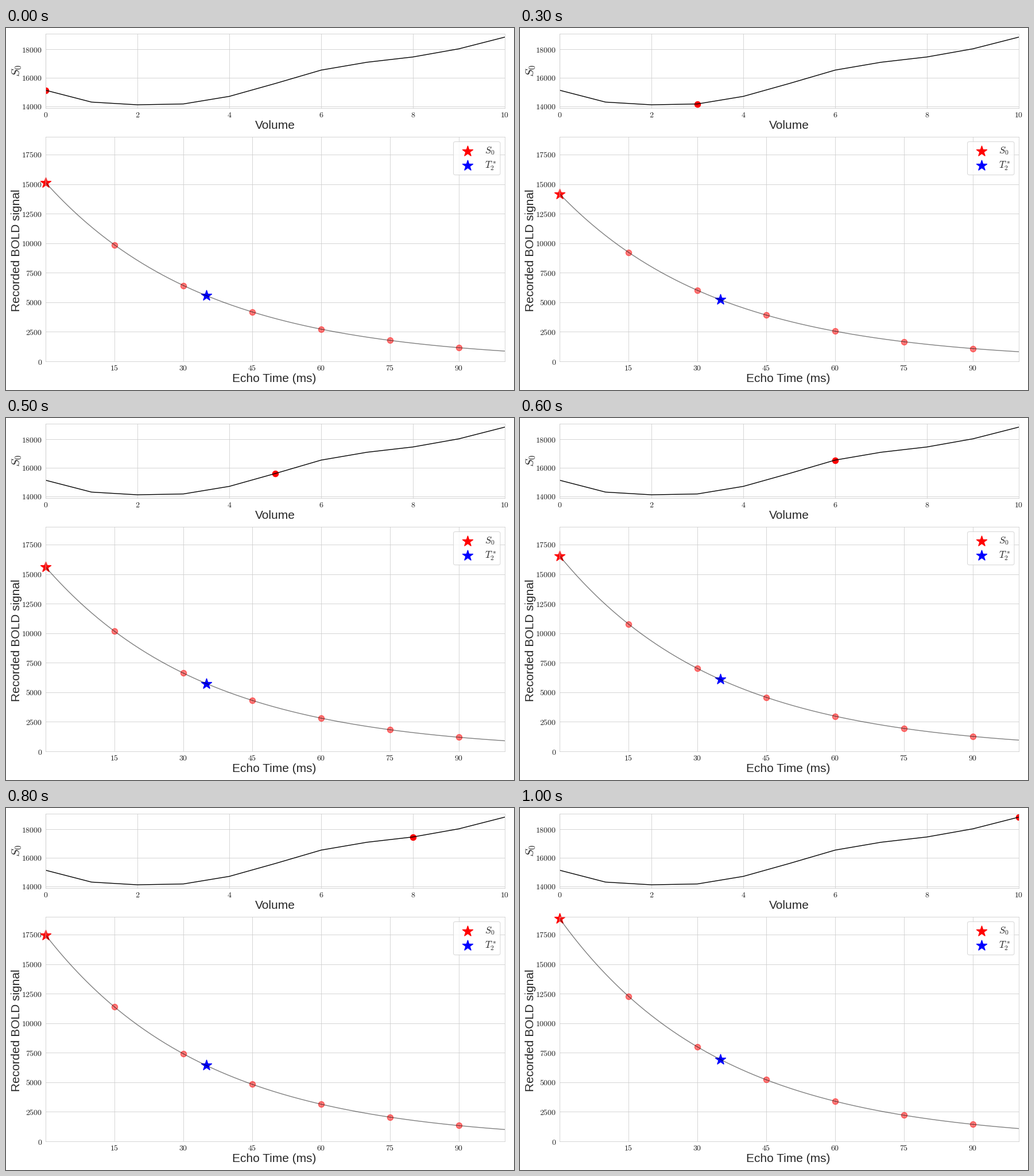
Animation, 885 px wide and 632 px high, one loop 1.1 s. Source, as a matplotlib script:

```python
import matplotlib.pyplot as plt
import numpy as np
from matplotlib.animation import FuncAnimation
from matplotlib.patches import FancyBboxPatch

W, H, DPI = 885, 632, 100
PX = 72 / DPI  # one pixel in points
INK, RULE = "0.15", "0.8"
T2 = 35
S0 = np.array([15130, 14300, 14110, 14170, 14700, 15600,
               16540, 17090, 17460, 18030, 18850])
ECHOES = np.arange(15, 91, 15)
TIMES = np.linspace(0, 100, 201)

plt.rcParams.update({"font.family": "Liberation Sans",
                     "mathtext.fontset": "cm",
                     "axes.axisbelow": True})
fig = plt.figure(figsize=(W / DPI, H / DPI), dpi=DPI, facecolor="white")


def panel(top, bottom, xlim, ylim, xticks, yticks):
    left, right = 69, 869
    ax = fig.add_axes([left / W, 1 - bottom / H,
                       (right - left) / W, (bottom - top) / H])
    ax.set(xlim=xlim, ylim=ylim, xticks=xticks, yticks=yticks)
    ax.grid(color=RULE, lw=0.8 * PX)
    ax.spines[:].set(color=RULE, linewidth=0.8 * PX)
    ax.tick_params(length=0, labelsize=10, labelcolor=INK)
    ax.tick_params(axis="x", pad=3.5)
    ax.tick_params(axis="y", pad=4.2)
    for axis in (ax.xaxis, ax.yaxis):
        axis.set_major_formatter(lambda v, _: f"${v:g}$")
    return ax


def signal(s0, t):
    return s0 * np.exp(-np.asarray(t) / T2)


def mark(ax, x, y, color, size, **kw):
    return ax.scatter(x, y, s=(size * PX) ** 2, color=color, lw=1.5 * PX, **kw)


def star(ax, x, y, color):
    return mark(ax, [x], [y], color, 18.7, marker="*", clip_on=False)


# Panels
margin = 0.05 * np.ptp(S0)
trend = panel(10, 140, (0, 10), (S0.min() - margin, S0.max() + margin),
              range(0, 11, 2), range(14000, 18001, 2000))
decay = panel(190, 582, (0, 100), (0, 19000),
              ECHOES, range(0, 17501, 2500))

trend.plot(S0, color="black", lw=1.4 * PX)
now = mark(trend, [0], [S0[0]], "red", 10)

curve, = decay.plot(TIMES, signal(S0[0], TIMES), color="black", alpha=0.5,
                    lw=1.4 * PX)
dots = mark(decay, ECHOES, signal(S0[0], ECHOES), "red", 10, alpha=0.5)
s0_star = star(decay, 0, S0[0], "red")
t2_star = star(decay, T2, signal(S0[0], T2), "blue")

# Labels and legend in pixel coordinates
page = fig.add_axes([0, 0, 1, 1])
page.set(xlim=(0, W), ylim=(H, 0))
page.axis("off")


def label(x, y, text, size=15, rotation=0, ha="center"):
    page.text(x, y, text, size=size, color=INK, ha=ha, va="baseline",
              rotation=rotation, rotation_mode="anchor")


label(469, 176.5, "Volume")
label(467.5, 618, "Echo Time (ms)")
label(24.5, 388, "Recorded BOLD signal", rotation=90)
label(24, 74.5, "$S_0$", rotation=90)

page.add_patch(FancyBboxPatch((779.5, 198.5), 81.5, 58,
                              boxstyle="round,pad=0,rounding_size=3.3",
                              fc="white", ec=RULE, lw=PX, alpha=0.8))
for y, color, text in ((214.5, "red", "$S_0$"), (240, "blue", "$T_2^*$")):
    star(page, 803.7, y, color)
    label(834.5, y + 5, text, size=12, ha="left")


def update(i):
    s0 = S0[i]
    now.set_offsets([(i, s0)])
    curve.set_ydata(signal(s0, TIMES))
    dots.set_offsets(np.column_stack([ECHOES, signal(s0, ECHOES)]))
    s0_star.set_offsets([(0, s0)])
    t2_star.set_offsets([(T2, signal(s0, T2))])
    return now, curve, dots, s0_star, t2_star


anim = FuncAnimation(fig, update, frames=len(S0), interval=100,
                     repeat=True, repeat_delay=0)
plt.show()
```
